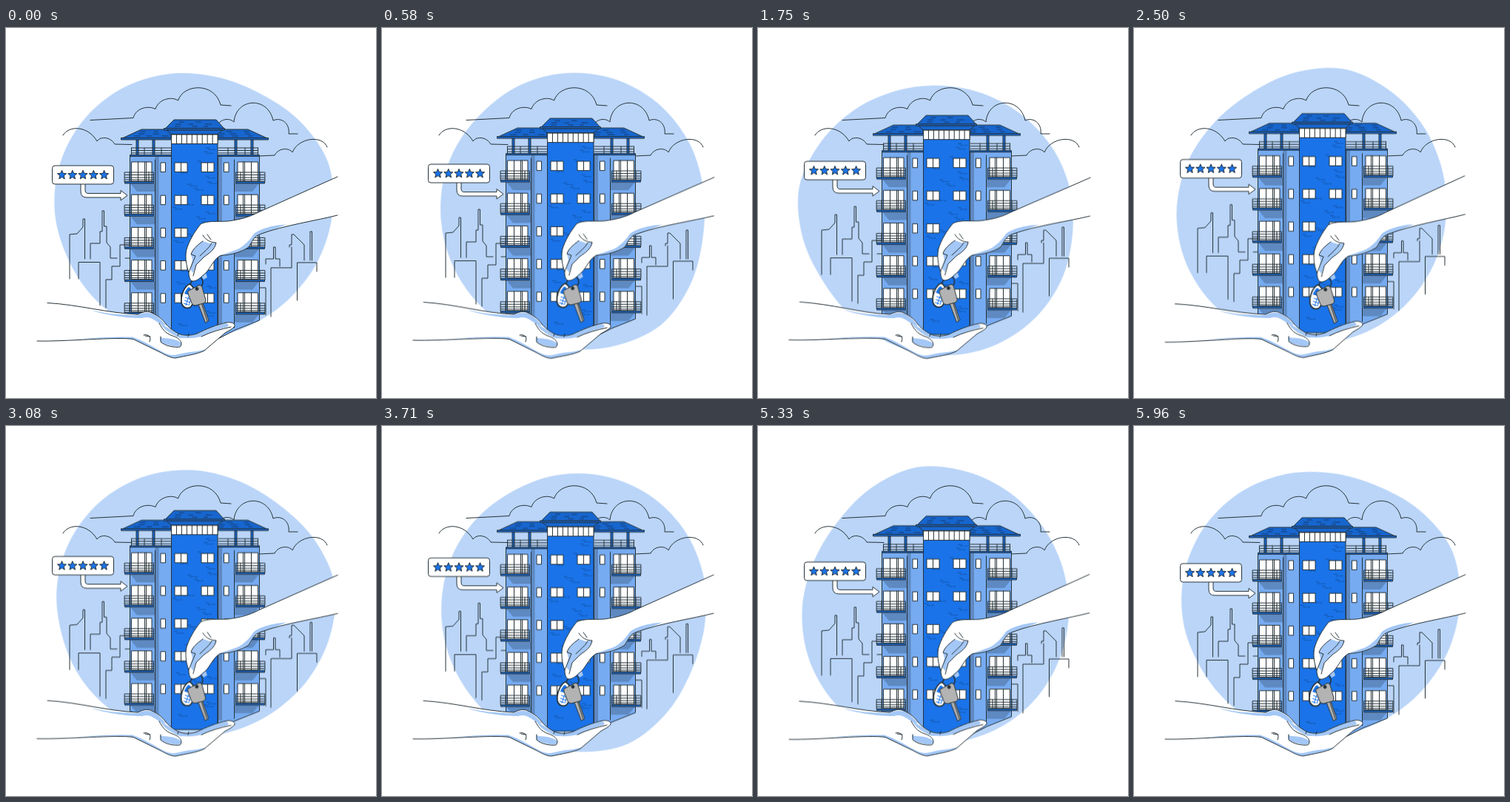
An HTML page for the animation above (6000 ms loop, 500 px wide and 500 px high).

```html
<!DOCTYPE html>
<html lang="en">
<head>
<meta charset="utf-8">
<title>House keys</title>
<style>
html, body { margin: 0; width: 100%; height: 100%; overflow: hidden; background: #fff; }
svg { display: block; width: 100%; height: 100%; }
.ln { fill: none; stroke: #263238; stroke-width: 1; stroke-linecap: round; stroke-linejoin: round; }
.o { stroke: #263238; stroke-width: 1; stroke-linejoin: round; }
.main { fill: #1a73e8; }
.roof { fill: #1766cf; }
.wall { fill: #76abf1; }
.shade { fill: #5e89c1; }
.white { fill: #fff; }
.tint { fill: #a3c7f6; }
.grey { fill: #b3b3b3; }
#blob { fill: #bad5f8; transform-origin: 250px 250px; animation: spin 3s linear infinite; }
.float { animation: float 6s linear infinite; }
.wind { animation: wind 1.5s linear infinite; }
#giver { transform-origin: 345px 300px; }
#taker { transform-origin: 176px 409px; }
@keyframes spin { to { transform: rotate(360deg); } }
@keyframes float { 50% { transform: translateY(-10px); } }
@keyframes wind {
  0%, 100% { transform: rotate(0deg); }
  25% { transform: rotate(1deg); }
  75% { transform: rotate(-1deg); }
}
</style>
</head>
<body>
<svg viewBox="0 0 500 500">
  <path id="blob"/>

  <g class="ln">
    <path d="M114 124.5L172 121.500C175 109 191 104 202 109.500C206 96 224 92 232.500 98C240 75 282 73 290 104L304 105"/>
    <path d="M77 145C85 131 111 132 123 153C128 146 141 147 147 157L170 157.500"/>
    <path d="M284 135C288 122 302 121 308 127C311 94 354 92 361 125C372 120 384 129 382 143L394 143"/>
    <path d="M342 173L363 172C369 161 383 162 387 168C395 148 428 144 434 161"/>
  </g>

  <g class="float">
    <g class="ln">
      <path d="M86 339V279L96 278L104 269V258H106.500V312"/>
      <path d="M114 312V291H127V275H130V247H132.500V268H136V290L141 296V311H150"/>
      <path d="M98 339V316.500H127V375M135 378V340H143V322H154V293H167M161 311H167"/>
      <path d="M342 351H351V388M358 390V324H386V296M383 296V293H386V279H389L403 293V314"/>
      <path d="M351 319V312H361.500V296H364V312H370V322M411 314V275H413.500V314M393.500 368V317H420V329"/>
    </g>
    <g id="building"></g>
  </g>

  <g id="giver" class="wind">
    <path class="ln" d="M252 341C247 347 249 352 257 352C266 351 268 344 264 338" style="stroke-width:1.6"/>
    <path class="white ln" d="M248 346C241 349 236 361 237 371C239 380 249 381 252 373C256 362 256 350 248 346Z" style="stroke-width:1.8;fill:#fff"/>
    <path class="main" d="M247 350C244 352 242 356 241 359L251 362C252 357 251 352 247 350Z"/>
    <path d="M242 364L250 367M241 368L249 371M240 372L246 374M247 363L243 375M250 365L247 375" fill="none" stroke="#1a73e8"/>
    <g class="o">
      <path class="grey" d="M259 371L264.500 368L274 395.500L269.500 398.500Z"/>
      <path class="ln" d="M264 371L272 396"/>
      <path class="grey" d="M247 355L261 347.500Q264 347 265 350L270 368Q270 371 267 372L256 375Q252 375 251 372L246 359Q245 356 247 355Z"/>
      <circle cx="258" cy="352.500" r="2" fill="#263238"/>
    </g>
    <path id="hand" class="white" d="M448 201L341 249C328 256 315 259 300 261C286 262 272 260 263 265C255 275 247 288 243.500 301C242 313 244 322 247 330C247 337 249 343 254 342C260 341 264 336 270 331C277 323 281 312 290 307.500C303 307 318 303 328 296C333 288 335 281 345 278C375 267 420 260 448 253"/>
    <g class="tint">
      <path d="M330 294C333 286 336 281 347 278L379 265.500C362 266 342 272 335 278C331 284 326 291 315 298C304 303 296 304 288 308C303 308 322 301 330 294Z"/>
      <path d="M266 288L275 291L284 290C282 300 274 304 268 309L257 320L253 331L249 326L252 314L250 306C252 299 258 294 266 288Z"/>
      <path d="M264 335L270 331L272 337L267 340Z"/>
    </g>
    <g class="ln">
      <path d="M448 201L341 249C328 256 315 259 300 261C286 262 272 260 263 265C255 275 247 288 243.500 301C242 313 244 322 247 330C247 337 249 343 254 342C260 341 264 336 270 331C277 323 281 312 290 307.500C303 307 318 303 328 296C333 288 335 281 345 278C375 267 420 260 448 253"/>
      <path d="M266 280C270 287 277 290 284 290C282 300 275 304 268 309L257 320L253 335"/>
      <path d="M266 288C258 294 252 299 250 306L256 308L251 320L247 330M278 291C274 298 267 303 262 308M272 279L277 286"/>
    </g>
  </g>

  <g id="taker" class="wind">
    <path class="white" d="M56 371.500C100 374 135 385 178 387C186 383 192 382 197 385C206 389 212 394 216 400C222 407 228 410 233 413C241 416 249 416 258 413C270 407 284 401 298 398C304 397 310 399 309 403C306 407 301 409 296 412L268 436C258 441 242 443 229 446C222 446 214 441 208 438L172 420.500C150 417 80 424 42 423"/>
    <g class="tint">
      <path d="M114 381C135 386 155 388 178 388C186 384 192 384 197 386C206 390 212 396 216 402C210 402 206 398 201 395C195 391 190 390 184 392C160 392 130 387 114 381Z"/>
      <path d="M209 400C217 403 224 409 233 413C241 416 249 416 258 413C270 407 284 401 297 399C301 400 302 402 299 404C288 407 274 412 264 417C252 420 243 419 235 419C225 414 215 410 209 400Z"/>
      <path d="M208 418C212 420 229 418 237 426C238 431 229 432 218 428C211 427 208 424 208 418Z"/>
      <path d="M95 421C120 418 150 417 171 417.500C184 422 199 431 212 438C220 442 225 443 233 441C248 437 258 438 270 434L268 436C258 441 242 443 229 446C222 446 214 441 208 438L172 420.500C150 418 120 420 95 421Z"/>
    </g>
    <g class="ln">
      <path d="M56 371.500C100 374 135 385 178 387C186 383 192 382 197 385C206 389 212 394 216 400C222 407 228 410 233 413C241 416 249 416 258 413C270 407 284 401 298 398C304 397 310 399 309 403C306 407 301 409 296 412L268 436C258 441 242 443 229 446C222 446 214 441 208 438L172 420.500C150 417 80 424 42 423"/>
      <path d="M207 399C211 406 214 412 225 416C235 419 240 426 235 431C228 432 215 430 209 424V417M186 415C193 413 197 418 194 424M188 416L195 417M233 413L232 416M247 413L246 417M264 417C276 411 290 407 304 404"/>
    </g>
  </g>

  <g class="float">
    <path class="white o" d="M101 210V221Q101 229 109 229H155V233L164 226.300L155 219.500V223.500H111Q107 223.500 107 219V210Z"/>
    <rect class="white o" x="62.500" y="186" width="83" height="25" rx="3.500"/>
    <g id="stars" class="main o"></g>
  </g>
</svg>
<script>
const $ = id => document.getElementById(id);
const rect = (cls, x, y, w, h) => `<rect class="${cls}" x="${x}" y="${y}" width="${w}" height="${h}"/>`;
const path = (cls, d) => `<path class="${cls}" d="${d}"/>`;
const polar = (r, deg) => [r * Math.cos(deg * Math.PI / 180), r * Math.sin(deg * Math.PI / 180)];

let seed = 11;
const rnd = () => (seed = seed * 16807 % 2147483647) / 2147483647;

// Closed smooth outline through evenly spaced radii
function blobPath(radii) {
  const pts = radii.map((r, i) => polar(r, i * 360 / radii.length).map(v => 250 + v));
  const at = i => pts[(i + pts.length) % pts.length];
  let d = `M${at(0)}`;
  pts.forEach((p, i) => {
    const a = at(i - 1), q = at(i + 1), b = at(i + 2);
    const c1 = p.map((v, k) => v + (q[k] - a[k]) / 6);
    const c2 = q.map((v, k) => v - (b[k] - p[k]) / 6);
    d += `C${c1} ${c2} ${q}`;
  });
  return d + 'Z';
}

function bricks(x0, x1, y0, y1, count) {
  let d = '';
  for (let i = 0; i < count; i++) {
    const x = x0 + rnd() * (x1 - x0 - 13), y = y0 + (i + rnd()) * (y1 - y0) / count;
    d += `M${x} ${y}h5m-2 2.2h5m1 0h4`;
  }
  return `<path d="${d}" fill="none" stroke="#155cba" stroke-width="1.3"/>`;
}

function tiles(x0, x1, y, rows, grow) {
  let d = '';
  for (let r = 0; r < rows; r++) {
    for (let x = x0 - r * grow + rnd() * 8; x < x1 + r * grow - 10; x += 16 + rnd() * 8)
      d += `M${x} ${y + r * 3}h${6 + rnd() * 4}`;
  }
  return `<path d="${d}" fill="none" stroke="#143b70" stroke-width="1.1"/>`;
}

// Drawn for the left side; shadeX places the dark strip along the wall
function wing(shadeX) {
  let s = path('wall o', 'M167.500 173H223.500V420L200 408L167.500 395Z') + rect('shade', shadeX, 173.500, 5, 234) +
    path('ln', 'M201.500 178V405');
  for (const x of [176, 198]) s += rect('roof o', x, 151, 3, 22);
  s += path('ln', 'M169.500 162H223M169.500 165.500H223M169.500 169H223M169.500 162V173M187 162V173M210 162V173');
  s += rect('roof o', 167.500, 171.500, 56, 2);
  s += path('roof o', 'M223 137H183L157 149H223Z') + tiles(181, 222, 140, 3, 5) + rect('roof o', 155.500, 148.500, 68, 2.500);
  for (let k = 0; k < 5; k++) {
    const y = 181 + 44.2 * k;
    s += path('shade', `M168 ${y + 29}H201V${y + 40}H177Z`);
    s += rect('white o', 169.500, y, 27.500, 26);
    s += path('ln', `M178.500 ${y}v26M187.500 ${y}v26M189.500 ${y}v26`);
    s += path('ln', `M160.500 ${y + 14}h39v13h-39zm0 3.500h39m-39 3.500h39m-39 3h39M167 ${y + 14}v13M193 ${y + 14}v13`);
    s += rect('roof o', 160.500, y + 26.500, 39, 2.500);
    s += rect('white o', 209, y + 1, 6.500, 12.500);
  }
  return s;
}

function building() {
  let s = wing(201.5) + `<g transform="matrix(-1 0 0 1 510 0)">${wing(218)}</g>`;
  s += rect('main o', 223.500, 137, 62.500, 283) + bricks(225, 285, 160, 400, 34);
  s += rect('white o', 223.500, 144, 62.500, 12.500);
  for (let i = 1; i < 9; i++) s += path('ln', `M${223.5 + i * 6.95} 144v12.500`);
  for (let k = 0; k < 5; k++) {
    for (const x of [228, 264]) {
      const y = 182 + 44.2 * k;
      s += rect('white o', x, y, 17, 12.500) + path('ln', `M${x + 8.5} ${y}v12.500`);
    }
  }
  s += path('roof o', 'M227 124H284L295 136H215Z') + tiles(228, 283, 127, 3, 3);
  s += rect('roof o', 213.500, 135.500, 82, 2.500);
  s += path('roof o', 'M217 138H293L286 143.500H223Z');
  return s;
}

function star(cx, cy) {
  const pts = [];
  for (let i = 0; i < 10; i++) {
    const [x, y] = polar(i % 2 ? 2.9 : 6.4, i * 36 - 90);
    pts.push(`${cx + x},${cy + y}`);
  }
  return `<polygon points="${pts.join(' ')}"/>`;
}

$('blob').setAttribute('d', blobPath([
  191, 183.5, 176.5, 172, 170, 170, 172, 174.5, 177.5,
  184, 189, 192, 192.5, 190.5, 187, 186.5, 192.5, 197.5
]));
$('building').innerHTML = building();
$('stars').innerHTML = [75.5, 89.8, 104, 118.3, 132.6].map(x => star(x, 198.7)).join('');
</script>
</body>
</html>
```
